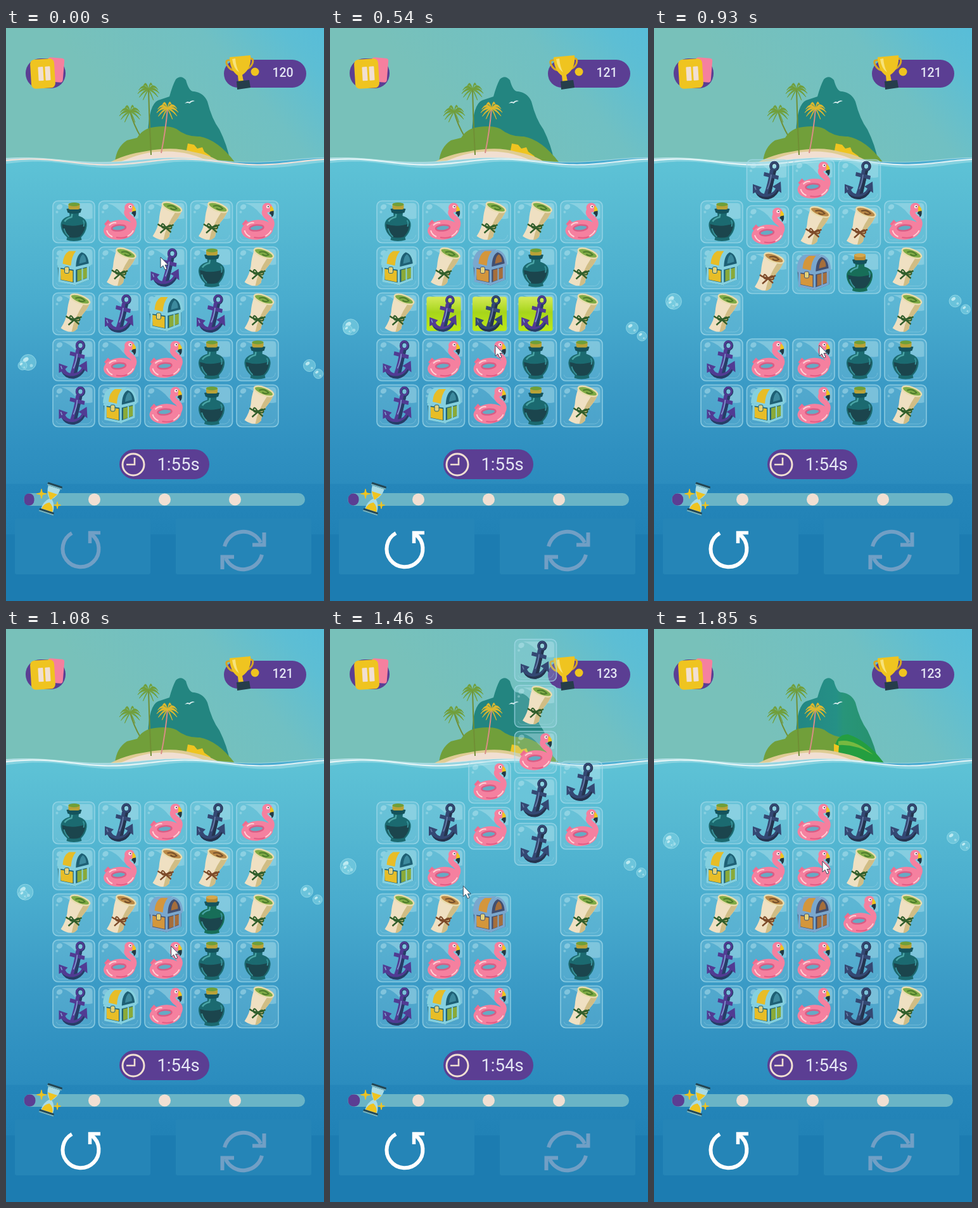
Animation of 502 by 903 pixels, one loop 1.93 s. Source, as an HTML page with a canvas:

```html
<!DOCTYPE html>
<html lang="en">
<head>
<meta charset="utf-8">
<title>Island match game</title>
<style>
html, body { margin: 0; width: 502px; height: 903px; overflow: hidden; background: #1b7cb2; }
canvas { display: block; }
</style>
</head>
<body>
<canvas id="stage" width="502" height="903"></canvas>
<script>
const ctx = document.getElementById('stage').getContext('2d');
const LOOP = 1930, STEP = LOOP / 25, PITCH = 72.5;
const PURPLE = '#5b3e93', YELLOW = '#efc420', CREAM = '#f1dfd2', PINK = '#f5809f';

function shape(d, fill, stroke, width = 1) {
  const p = new Path2D(d);
  if (fill) { ctx.fillStyle = fill; ctx.fill(p); }
  if (stroke) { ctx.strokeStyle = stroke; ctx.lineWidth = width; ctx.stroke(p); }
}
function box(x, y, w, h, r, fill, stroke, width = 1) {
  ctx.beginPath();
  ctx.roundRect(x, y, w, h, r);
  if (fill) { ctx.fillStyle = fill; ctx.fill(); }
  if (stroke) { ctx.strokeStyle = stroke; ctx.lineWidth = width; ctx.stroke(); }
}
function oval(x, y, rx, ry, fill, stroke, width = 1, turn = 0) {
  ctx.beginPath();
  ctx.ellipse(x, y, rx, ry, turn, 0, 7);
  if (fill) { ctx.fillStyle = fill; ctx.fill(); }
  if (stroke) { ctx.strokeStyle = stroke; ctx.lineWidth = width; ctx.stroke(); }
}
function blend(x0, y0, x1, y1, ...stops) {
  const g = ctx.createLinearGradient(x0, y0, x1, y1);
  stops.forEach(([at, color]) => g.addColorStop(at, color));
  return g;
}
function at(x, y, turn, scale, paint) {
  ctx.save();
  ctx.translate(x, y);
  ctx.rotate(turn);
  ctx.scale(scale, scale);
  paint();
  ctx.restore();
}
function text(s, x, y, size, weight) {
  ctx.font = `${weight} ${size}px Roboto, sans-serif`;
  ctx.textAlign = 'center';
  ctx.fillStyle = '#e4e6f4';
  ctx.fillText(s, x, y);
}

// Pieces live in a 67 x 67 box; lower-case letters use the second colour set.
const pieces = {
  B(alt) {
    shape('M26 14H42L41 24Q55 28 54 40Q53 50 45 58L46 62Q33 66 22 62L23 58Q14 50 13 40Q12 28 27 24Z',
      alt ? '#176e58' : '#1b6a70');
    shape('M15 37Q33 43 52 36Q52 48 43 57Q33 60 24 57Q15 48 15 37Z', '#1b454d');
    shape('M22 13Q34 10 46 13L44 19Q34 22 24 19Z', '#14535c');
    shape('M31 21L30 26Q22 28 19 33', null, '#4aa5a6', 2.5);
    shape('M18 44Q20 52 26 57M48 31Q51 35 49 41', null, '#37939a', 2);
    box(25, 4, 18, 10, 3, alt ? '#b98b34' : '#b9a238');
    oval(34, 6, 9, 3, alt ? '#d6a84c' : '#6f9f38');
  },
  F() {
    shape('M9 37L15 30Q20 36 25 36L18 46Z', '#ee6d90');
    oval(33, 46, 25, 15.5, PINK, null, 1, -.1);
    oval(32, 43, 11, 4.5, '#66aac4', '#d95d85', 2.5, -.1);
    shape('M52 46C60 36 55 30 49 26C43 21 43 16 49 13', null, PINK, 8.5);
    oval(49, 11, 8, 7.5, PINK);
    shape('M54 8Q60 11 59 18L53 18Z', YELLOW);
    shape('M54 17L59 16Q60 24 56 26Q56 22 52 20Z', '#233a46');
    oval(50, 9.5, 2.6, 2.6, '#fff0ee');
    oval(50.5, 9.5, 1.1, 1.1, '#273b48');
    shape('M13 47Q15 54 22 57M46 56Q53 52 55 47M17 39Q22 34 28 35', null, '#ffd1d5', 2);
    shape('M28 58Q38 60 45 57', null, '#e45c84', 2);
  },
  S(alt) {
    shape('M28 7Q43 0 59 16Q55 26 47 35Q41 44 39 57Q29 67 13 56Q21 44 23 31Q24 18 28 7Z', '#efe0c2');
    shape('M49 18L59 16Q55 26 47 35Q41 44 39 57Q35 62 30 62Q34 40 49 18Z', '#d0bd85');
    oval(43.5, 10.5, 16, 6, alt ? '#ba8947' : '#7fab45', '#e9dcad', 2.5, .36);
    shape('M36 9Q45 6 51 13Q46 16 41 12', null, alt ? '#75502c' : '#4d7b2c', 2);
    const ribbon = alt ? '#7c4a29' : '#315e2b';
    shape('M21 37Q32 46 46 38M34 43L25 51M34 43L42 50', null, ribbon, 2.4);
    shape('M34 43Q28 32 27 40Q27 44 34 43Q42 35 43 42Q43 46 34 43', null, ribbon, 2);
  },
  C(alt) {
    const trim = alt ? '#7aa7ce' : '#85d0df', gold = alt ? '#d4963c' : '#e7bd27';
    const dark = alt ? '#424f70' : '#1e6075';
    shape('M8 31L35 35L58 29V52L35 61L10 55Z', dark);
    shape('M7 29Q8 8 20 5L45 4Q36 12 35 34Z', trim);
    shape('M16 27Q17 12 26 7L37 7Q30 15 29 30Z', gold);
    shape('M35 34Q35 12 46 7Q58 10 59 28Z', dark, trim, 3.5);
    shape('M42 27Q43 15 48 12Q53 16 53 24Z', alt ? '#a56e3c' : '#3d8a9e');
    shape('M12 35L32 38V56L13 52Z', gold);
    shape('M39 37L55 33V49L39 55Z', alt ? '#a56e3c' : '#8aaa39');
    shape('M8 31L35 35L59 29M11 32V54L35 59V35M35 59L56 51V31', null, trim, 3.5);
    shape('M47 34V53', null, trim, 2);
    box(19, 32, 7, 10, 2, '#e4d27a', dark);
  },
  A(alt) {
    const body = alt ? '#344873' : '#513b93', shade = alt ? '#25344f' : '#263e67';
    oval(44, 11, 5.5, 6, null, shade, 4.5);
    oval(43.5, 10.5, 5.5, 6, null, body, 3);
    shape('M37 16L47 18L38 57L27 57Q34 38 37 16Z', body);
    shape('M43 17L47 18L38 57L33 57Z', shade);
    shape('M28 20L51 26L50 32L27 26Z', body);
    shape('M10 39L24 44L20 48Q23 55 32 55Q42 54 46 46L41 43L54 35L55 53L51 50Q45 61 34 63Q20 64 14 52L10 54Z', body);
    shape('M14 52Q21 60 33 59Q44 57 49 48L51 50Q45 61 34 63Q20 64 14 52Z', shade);
    shape('M39 24Q38 36 33 47M13 43L15 48', null, alt ? '#6a80aa' : '#7fa3d2', 1.6);
  }
};
const paintPiece = c => pieces[c.toUpperCase()](c !== c.toUpperCase());

// Columns, each from top to bottom.
const boards = {
  start: ['BCSAA', 'FSAFC', 'SACFF', 'SBABB', 'FSSBS'],
  swapped: ['BCSAA', 'FSAFC', 'ScaFF', 'SBABB', 'FSSBS'],
  fallen: ['BCSAA', 'aFsFC', 'fscFF', 'asbBB', 'FSSBS'],
  final: ['BCSAA', 'aFsFC', 'ffcFF', 'aSfaa', 'afSBS']
};
const firstMatch = ['12', '22', '32'];
const secondMatch = ['21', '31', '41', '32', '33', '34'];

function frame(alpha) {
  ctx.globalAlpha = alpha;
  box(.5, .5, 66, 66, 8, 'rgba(165,220,232,.22)', 'rgba(165,220,236,.7)', 1.6);
  shape('M14 4H58Q63 4 63 10V28Q48 32 38 21Q28 8 14 4Z', 'rgba(190,232,238,.38)');
  oval(11, 10, 5, 4, 'rgba(200,238,244,.4)', null, 1, -.6);
  oval(7, 18, 2, 2, 'rgba(200,238,244,.35)');
  shape('M6 57Q7 62 13 62H54Q61 61 62 54', null, 'rgba(180,226,238,.3)');
  ctx.globalAlpha = 1;
}
function burst(age) {
  const half = 27 - age * 2.2;
  if (age) for (let i = 0; i < 14; i++) {
    const a = i * Math.PI / 7, r = 19 + age * 1.5 + i % 3;
    oval(33.5 + r * Math.cos(a), 33.5 + r * Math.sin(a), 7, 7, '#f5fbeb');
  }
  box(33.5 - half, 33.5 - half, half * 2, half * 2, 4 + age * 5,
    blend(0, 7, 0, 60, [0, '#d3ea57'], [.45, '#a7d51b'], [1, '#bde915']));
  if (age) for (let i = 0; i < 9; i++) {
    const a = i * 2.4;
    oval(33.5 + 21 * Math.cos(a), 33.5 + 21 * Math.sin(a), 2.5, 2, '#eefac4');
  }
}
const clamp = u => Math.max(0, Math.min(1, u));

function drawBoard(k, t) {
  const name = k < 6 ? 'start' : k < 11 ? 'swapped' : k < 18 ? 'fallen' : 'final';
  const first = k >= 7 && k < 11, second = k >= 15 && k < 18;
  const matched = first ? firstMatch : second ? secondMatch : [];
  const age = k - (first ? 7 : 15);
  const swap = name === 'start' ? clamp((t - 270) / 190) : 0;
  const left = 1 - (name === 'fallen' ? clamp((t - 853) / 228) : clamp((t - 1390) / 225)) ** 2;
  const drops = name === 'fallen' ? [0, 1, 1, 1, 0] : name === 'final' ? [0, 0, 1, 4, 1] : [];
  const last = name === 'fallen' ? [0, 2, 2, 2] : [0, 0, 1, 4, 1];
  boards[name].forEach((column, c) => [...column].forEach((piece, r) => {
    const hit = matched.includes(`${c}${r}`);
    if (hit && age > 2) return;
    let row = r;
    if (c === 2 && r === 1) row += swap;
    if (c === 2 && r === 2) row -= swap;
    if (drops[c] && r <= last[c]) row -= drops[c] * left;
    at(73.5 + c * PITCH, 272 + row * PITCH, 0, 1, () => {
      frame(hit ? 1 - age * .45 : 1);
      if (hit) burst(age);
      const s = hit ? .95 - age * .11 : 1;
      at(33.5 * (1 - s), 33.5 * (1 - s), 0, s, () => paintPiece(piece));
    });
  }));
}

function palm(x, y, foot, base, trunk, leaf) {
  shape(`M${x} ${y}Q${x + (foot - x) * .3} ${(y + base) / 2} ${foot} ${base}`, null, trunk, 2);
  for (const a of [-2.7, -2.1, -1.2, -.5, 0, .5, 1.1, 2.1, 2.6, 3.1]) {
    const dx = 17 * Math.cos(a), dy = 12 * Math.sin(a);
    shape(`M${x} ${y}q${dx * .5} ${dy - 7} ${dx} ${dy + 6}q${-dx * .4} ${-7} ${-dx} ${-dy - 6}`, leaf, leaf, .8);
  }
}
function drawIsland(late) {
  shape('M224 165Q226 120 240 114L258 108Q263 90 268 81Q276 73 284 82Q289 101 297 100Q312 102 318 116Q325 144 337 160Q349 184 354 210H224Z',
    late ? blend(230, 0, 345, 0, [0, '#238783'], [.5, '#259086'], [.6, '#28957a'], [1, '#27926f']) : '#238580');
  palm(196, 132, 213, 172, '#708f35', '#719f3a');
  shape('M172 211Q174 188 191 177L207 173Q216 158 235 156Q257 153 269 159Q285 172 306 171Q334 176 361 211Z', '#719f3a');
  if (late) {
    shape('M285 190Q287 166 306 166Q336 175 363 211H285Z', '#249e40');
    shape('M291 177Q313 171 346 198Q318 181 291 183Z', '#77b940');
    shape('M284 181L292 184L291 196H284Z', YELLOW);
  } else {
    shape('M284 198L287 182L297 184L302 190L310 188L313 195L323 202L321 208H284Z', YELLOW);
  }
  shape('M162 213Q186 199 222 194Q264 186 294 195Q324 200 341 213Z', '#dfcc94');
  shape('M174 214Q212 196 240 195Q285 191 326 213Z', CREAM);
  palm(225, 97, 229, 200, '#708f35', '#719f3a');
  palm(255, 127, 245, 197, '#d88d86', '#e0b92e');
  shape('M282 119Q287 114 289 117Q293 113 298 115Q292 116 290 119Q287 117 282 119', '#dceff0');
}

function waveLine(t, lift) {
  const sway = 10 * Math.sin(t / LOOP * Math.PI * 2);
  let d = '';
  for (let x = 0; x <= 504; x += 6)
    d += `${x ? 'L' : 'M'}${x} ${211 + lift + (4.5 + lift * .3) * Math.sin((x - 100 + sway - lift * 4) * Math.PI / 120)}`;
  return d;
}
function drawSea(t) {
  shape(waveLine(t, -3) + 'V903H0Z', blend(0, 0, 502, 0, [0, '#a9dbe2'], [.55, '#8fd0df'], [.75, '#369fcb'], [1, '#62bbd8']));
  shape(waveLine(t, 1) + 'V903H0Z', blend(0, 205, 0, 903,
    [0, '#5ec3d6'], [.14, '#56b9d2'], [.32, '#49acce'], [.5, '#3b9bc6'], [.65, '#3091c1'],
    [.735, '#2b8cbe'], [.736, '#2586ba'], [.849, '#2182b6'], [.85, '#1c7cb1'], [1, '#1c7cb1']));
  shape(waveLine(t, 2), null, 'rgba(180,229,236,.45)', 5);
  shape(waveLine(t, 0), null, t < 80 ? '#efe2d9' : 'rgba(239,250,250,.85)', 2.2);
  shape(waveLine(t, -3), null, 'rgba(225,246,247,.5)', 1);
}
function bubble(x, y, r) {
  oval(x, y, r, r, 'rgba(125,208,226,.65)', 'rgba(165,226,237,.65)');
  oval(x - r * .3, y - r * .35, r * .38, r * .25, 'rgba(215,245,248,.75)', null, 1, -.6);
  oval(x + r * .4, y + r * .4, r * .2, r * .2, 'rgba(200,238,244,.55)');
}
function drawBubbles(t) {
  const u = t / 1850, y = 528 - 194 * u, spread = Math.max(0, 1 - u * 3);
  bubble(27 + 8 * (1 - u), y - spread, 12.5);
  bubble(30 - 4 * spread - 5 * u, y + 4, 7);
  bubble(479 - 7 * u, 532 - 203 * u, 9.5);
  bubble(493 - 2 * u, 545 - 203 * u, 7.5);
}

function drawHeader(k) {
  box(31, 48, 63, 47, 23, PURPLE);
  at(78, 66, .08, 1, () => box(-13, -19, 26, 38, 4, PINK));
  at(58, 72, -.06, 1, () => {
    box(-19, -23, 38, 46, 7, YELLOW);
    box(-7, -11, 8, 22, 1, CREAM);
    box(4, -11, 8, 22, 1, CREAM);
  });
  box(344, 50, 130, 44, 22, PURPLE);
  shape('M355 51Q345 49 349 58Q353 66 361 67M384 48Q392 47 389 56Q386 63 379 65', null, '#d6a526', 3);
  shape('M353 46L386 43Q388 64 373 74L375 84L367 85L366 75Q353 66 353 46Z', YELLOW);
  shape('M357 49L362 48Q363 61 368 70Q359 64 357 49Z', '#f7e27a');
  shape('M364 84L384 82L386 94L365 97Z', '#263d4b');
  oval(393, 69, 6.5, 6.5, YELLOW);
  text(k < 7 ? 120 : k < 15 ? 121 : k < 16 ? 122 : 123, 437, 77, 19.5, 500);
}
function star(x, y, r) {
  const q = r * .2;
  shape(`M${x} ${y - r}L${x + q} ${y - q}L${x + r} ${y}L${x + q} ${y + q}L${x} ${y + r}L${x - q} ${y + q}L${x - r} ${y}L${x - q} ${y - q}Z`, YELLOW, YELLOW, 1);
}
function drawFooter(k, t) {
  box(179, 664, 142, 47, 23.5, PURPLE);
  oval(201, 688, 17, 17, null, CREAM, 3);
  shape('M203 677V688H190', null, CREAM, 2.6);
  text(k < 10 ? '1:55s' : '1:54s', 272, 697, 27.5, 400);

  box(28, 733, 444, 20, 10, '#6ab4c6');
  box(28.5, 733.5, 16 + 3.5 * t / LOOP, 19, 8.5, PURPLE);
  for (let i = 0; i < 3; i++) oval(139.5 + i * 111, 743, 9.5, 9.5, CREAM);
  at(70.5, 742, .31, 1, () => {
    shape('M-10 -20H10Q10 -7 2 0Q10 7 10 20H-10Q-10 7 -2 0Q-10 -7 -10 -20Z', '#a9dbe5');
    shape('M-8 -10H8L1 1H-1ZM-9 19Q-8 10 0 6Q8 10 9 19Z', YELLOW);
    for (const y of [-24, 19]) {
      box(-12, y, 24, 5, 1, '#244653');
      box(-12, y + 3, 24, 2, 0, '#75b5c4');
    }
  });
  star(56, 734, 7.5);
  star(81, 752, 5.5);

  for (const x of [14, 268]) box(x, 773, 214, 88, 3, '#2585b7');
  ctx.lineJoin = 'miter';
  const undo = k < 7 ? '#719fc5' : '#ffffff', idle = '#719fc5';
  shape('M104 796A28.5 28.5 0 1 0 135 798', null, undo, 6);
  shape('M149 795.5H132.5V812', null, undo, 5.5);
  shape('M345 817A30.5 30.5 0 0 1 402 811M404 830A30.5 30.5 0 0 1 347 836', null, idle, 6);
  shape('M407.5 795V814.5H389M341.5 853V833.5H360', null, idle, 6);
}

const path = [[0, 244, 361], [232, 257, 371], [310, 259, 400], [390, 261, 470], [463, 261, 500],
  [1080, 261, 500], [1312, 186, 431], [1390, 188, 425], [1621, 255, 364], [1853, 266, 366]];
function drawCursor(t) {
  const i = Math.max(1, path.findIndex(p => p[0] >= t));
  const [t0, x0, y0] = path[i - 1], [t1, x1, y1] = path[i], u = clamp((t - t0) / (t1 - t0));
  at(x0 + (x1 - x0) * u, y0 + (y1 - y0) * u, 0, 1, () =>
    shape('M0 0V17L4 13.5L7 20L10 18.5L7 12.5H12Z', '#fff', '#354a5d', 1));
}

function draw(now) {
  const k = Math.floor(((now % LOOP) + 9) / STEP) % 25, t = k * STEP, late = k >= 20;
  ctx.lineCap = 'butt';
  ctx.fillStyle = blend(late ? 200 : 230, 190, 480, -20,
    [0, '#78c1ba'], [.55, '#70c0c3'], [.85, '#5dbed4'], [1, '#58bdd8']);
  ctx.fillRect(0, 0, 502, 230);
  drawIsland(late);
  drawSea(t);
  drawBubbles(t);
  drawHeader(k);
  drawFooter(k, t);
  drawBoard(k, t);
  drawCursor(t);
}

const begin = performance.now();
function tick() {
  draw(performance.now() - begin);
  requestAnimationFrame(tick);
}
tick();
</script>
</body>
</html>
```
